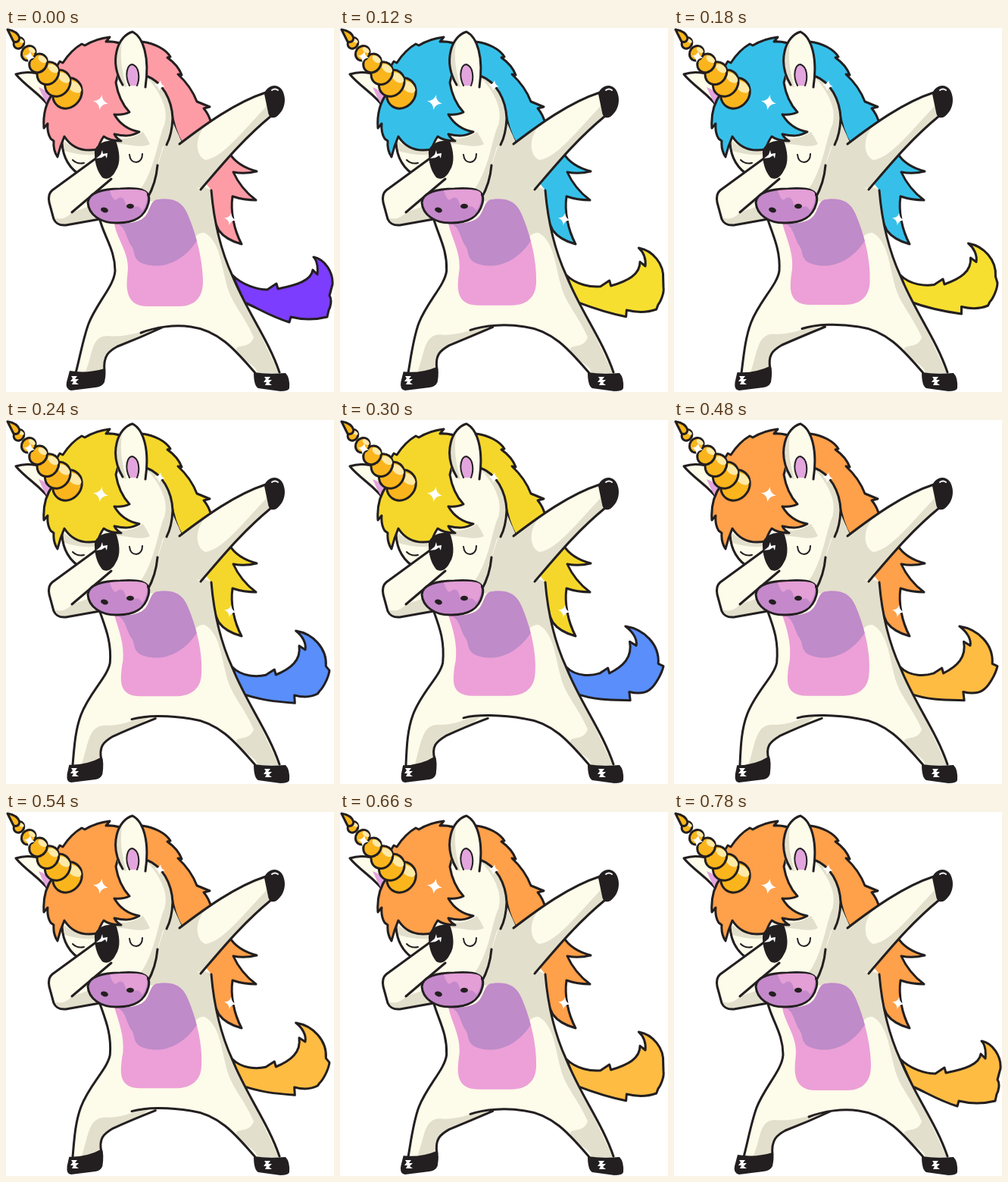
These frames come from a looping animation (433x480 px, 0.84 s). An HTML page:

```html
<!DOCTYPE html>
<html lang="en">
<head>
<meta charset="utf-8">
<title>Dabbing unicorn</title>
<style>
html, body { margin: 0; width: 100%; height: 100%; overflow: hidden; background: #fff; }
svg { display: block; width: 433px; height: 480px; }
.line { stroke: #231f20; stroke-width: 3; stroke-linejoin: round; stroke-linecap: round; fill: none; }
.thin { stroke-width: 2; }
.skin { fill: #fdfbea; }
.shade { fill: #e2dfcc; }
.hair { fill: var(--mane); }
.tail { fill: var(--tail); }
.hoof { fill: #231f20; }
.pink { fill: #e2a5dd; }
.muzzle { fill: #c589cb; }
.gold { fill: #fbb51c; }
.glint { fill: #fff; }
</style>
</head>
<body>
<svg viewBox="0 0 433 480">
  <defs>
    <path id="star" d="M0-10Q1.5-1.5 10 0Q1.5 1.5 0 10Q-1.5 1.5-10 0Q-1.5-1.5 0-10Z"/>
    <path id="zig" d="M0 0h8l-3 4 5 0-4 4 4 3-9 0 2-4-4 0 3-4Z"/>
    <clipPath id="patchClip"><path id="patchShape"/></clipPath>
    <clipPath id="bodyClip"><path id="bodyShape"/></clipPath>
  </defs>

  <!-- a~b blends from the low tail pose to the high one -->
  <path class="line tail" data-d="M299 326C312 339 332 345~336 345~342 345~332L357~353 337~325L359~355 344~332
    C384~372 339~322 403~383 333~309 405~378 319~287L411~387 325~292C412~389 315~284 410~382 306~274 406~371 302~266
    C421~397 305~270 432~420 322~290 431~418 338~318L427~427 353~319C431~423 358~332 428~413 369~346 426~408 372~350
    L424~405 381~351C408~400 385~356 392~391 385~356 376~383 381~354L374~385 388~366
    C348~360 380~367 332~338 369~370 315~309 362~360Z"/>

  <path class="line hair" d="M179 18C196 20 211 28 217 38L213 39C223 46 229 54 232 62L227 61C239 72 247 84 252 97L269 104L261 106Q268 114 271 126L232 152Q222 135 218 108L185 62Z"/>
  <path class="line hair" d="M295 165Q305 182 331 189Q315 193 300 190Q310 212 330 227Q314 227 299 222C296 242 301 266 311 285C296 281 287 275 281 267L256 212Z"/>

  <path id="body" class="skin"/>
  <g clip-path="url(#bodyClip)">
    <path class="shade" d="M185 200L232 150L262 210L276 215L307 342L360 455L332 455C328 440 312 442 304 426C302 415 321 425 327 408C316 381 296 361 291 337C284 312 282 280 262 270Q255 269 249 276L222 232L187 228Z"/>
    <path class="shade" data-d="M105~98 453C115~106 430~423 112~108 407~402 133~128 406~401C158~154 409~402 180~163 399~390 205~181 394~391L190~172 405~399C150~137 421~409 130~122 431 131~125 453Z"/>
  </g>
  <path id="patch" fill="#eca0d7"/>
  <path clip-path="url(#patchClip)" fill="#bf8bc9" d="M140 254C160 261 157 275 166 288C171 296 167 306 182 311C211 320 236 304 251 282L258 270L230 215L180 218Z"/>
  <path class="line" data-d="M124 253C130~133 276 144~137 293 144~134 320C143~130 340~338 120~105 362~358 109~94 390~388C102~86 409 98~86 432 92~86 455"/>
  <path class="line" data-d="M130~124 452~447C128~119 432~430 136~125 426~424 147~138 420~416Q178~160 408~405 206~193 395~393M178~160 402~391C198~178 394~387 223~210 391~388 244 394C283 399 306 429 329 455"/>
  <path class="line" d="M271 214C274 250 282 290 299 327C318 374 346 410 361 454"/>
  <path class="hoof" data-d="M84~83 452~456Q107 456~455 130~125 449~442Q133~128 453~450 130~126 467Q127~124 473 118 474L86 478Q78~80 476~479 80~81 467Z"/>
  <path class="hoof" d="M327 454Q345 457 369 455Q375 461 374 475Q373 479 362 479L333 475Q327 472 327 454Z"/>
  <use href="#zig" class="glint" x="86" y="459"/>
  <use href="#zig" class="glint" x="341" y="460"/>

  <path class="skin" d="M219 122L232 151C267 125 306 98 343 84L350 116C311 148 283 183 257 213L238 205L205 170Z"/>
  <path class="shade" d="M219 122L232 151L262 130C248 147 251 169 263 174C286 172 316 132 345 102L350 116C313 145 283 181 258 211L222 208L192 214L200 182Z"/>
  <path class="line" d="M229 153C263 127 303 98 343 85M350 116C311 148 283 183 257 213"/>
  <path class="hoof" d="M341 87C344 76 357 72 364 81C371 92 369 108 357 117C352 120 347 118 346 111Z"/>
  <path class="line thin" style="stroke:#fff" d="M351 82q4-3 8 0"/>

  <path class="line skin" d="M58 105C47 88 26 77 13 61C30 55 50 60 64 71L72 95Z"/>
  <path class="pink" d="M43 78Q55 82 60 92L55 102Q48 90 43 78Z"/>
  <path class="skin" d="M73 145C74 163 79 179 94 191L118 210L110 230L187 230Q197 206 200 182L208 157C220 140 221 119 217 103C212 83 200 69 185 63L145 50L90 80Z"/>
  <path class="shade" d="M75 148C89 160 110 164 121 162L120 156L149 146Q166 147 181 137Q186 145 190 153C179 160 155 151 145 153L125 166Q103 170 77 162Z"/>
  <path class="shade" d="M187 66C205 72 218 95 220 119Q219 145 207 157L199 184L187 227L175 216C197 188 200 147 209 128C215 109 206 88 187 66Z"/>
  <path class="line" d="M185 63C207 71 219 95 220 119Q219 141 212 154M200 181Q198 204 187 224M74 143C73 164 80 181 95 192"/>
  <path class="line thin" d="M88 174Q94 180 103 178M163 167Q164 177 172 177Q180 176 180 166"/>

  <path class="line hair" d="M61 69Q64 54 71 44L75 46Q86 29 100 21L104 23Q119 14 137 12L132 18Q147 17 158 24L145 72Q149 96 163 111Q155 115 143 114Q154 133 176 137C165 143 157 143 143 140Q146 146 152 149Q137 149 129 143Q124 150 121 160C100 164 86 157 77 143Q71 157 68 170Q62 161 63 149L59 146Q54 138 55 126L50 132Q48 105 62 86Z"/>
  <path class="skin" d="M154 75C135 43 148 10 167 5C181 12 190 38 184 78L168 84Z"/>
  <path class="shade" d="M148 68Q140 38 153 19Q149 45 159 78L154 77Z"/>
  <path class="line" d="M154 75C135 43 148 10 167 5C181 12 190 38 184 78"/>
  <path class="line pink thin" d="M163 76C156 62 160 48 167 48C176 51 177 66 173 76"/>

  <g id="horn"></g>

  <path class="skin" d="M120 170L61 214Q55 219 57 230L63 252Q67 261 79 260L124 252L140 212L146 190Z"/>
  <path class="shade" d="M87 243L111 235L114 248L124 252L79 260Q67 261 63 250Q77 255 87 243Z"/>
  <path class="line" d="M120 171L61 214Q55 219 57 230L63 252Q67 261 79 260L124 252M87 243L139 199"/>
  <path class="hoof" d="M117 166C116 153 132 147 145 149C150 162 152 178 145 188C140 198 133 201 127 197C120 188 117 177 117 166Z"/>
  <path class="glint" d="M119 172l6-5 2-6 1 5 6-1-1 7-2-4-5 3Z"/>

  <path class="line muzzle" d="M108 230C109 217 128 212 151 212C181 210 192 215 188 231C183 250 169 257 148 257C125 258 109 246 108 230Z"/>
  <path fill="#e39fd6" d="M137 214Q184 210 186 218Q187 232 180 241Q175 232 167 237Q160 241 157 229Q153 220 146 226Q141 229 137 214Z"/>
  <ellipse class="hoof" cx="130" cy="240" rx="5" ry="3.3" transform="rotate(15 130 240)"/>
  <ellipse class="hoof" cx="164" cy="235" rx="5" ry="3.3"/>

  <g id="stars" class="glint"></g>
</svg>
<script>
const STEP = 60, COUNT = 14, LAST = 6;
const $ = id => document.getElementById(id);

// First step, mane colour, tail colour
const palette = [
  [0, '#fe9ca5', '#7c3dfe'],
  [2, '#36c0e9', '#f7df30'],
  [4, '#f5d72b', '#598efb'],
  [6, '#16edc8', '#636eff'],
  [8, '#ffa04a', '#ffbc43']
];

// The head stays put; the belly leans with the hips.
const torso = `M124 253C130~133 276 144~137 293 144~134 320C143~130 340~338 120~105 362~358 109~94 390~388
  C102~86 409 98~86 432 92~86 455L130~124 452C128~119 432~430 136~125 426~424 147~138 420~416
  Q178~160 408~405 206~193 395~393C223~210 391~388 244 394 244 394C283 399 306 429 329 455L361 455
  C346 410 318 374 299 327C282 290 274 250 271 214L225 155L180 190Z`;
const belly = `M143 257C145~150 276 162~154 295 161~151 318C160~148 329 159~148 339 160~148 345
  C162~149 360~357 171~157 367~363 187~173 367~363L229~222 367~363C249~245 367~363 260~256 355~351 260~257 335
  C260 309 252 273 239 244C232 229 221 224 202 226C188 226 192 246 178 253Q163 260 143 257Z`;
for (const id of ['body', 'bodyShape']) $(id).dataset.d = torso;
for (const id of ['patch', 'patchShape']) $(id).dataset.d = belly;

// Horn rings shrink evenly from the brow to the tip.
const ring = (x, y, r) => `<g transform="translate(${x} ${y}) rotate(36)">
  <ellipse class="line gold" rx="${r * .87}" ry="${r}"/>
  <ellipse fill="#ffe9a6" cx="${r * .12}" cy="${-r * .58}" rx="${r * .5}" ry="${r * .3}"/></g>`;
$('horn').innerHTML = [0, 1, 2, 3, 4, 5].map(i => ring(81 - 12.8 * i, 86 - 13.2 * i, 21 - 2.7 * i)).join('') +
  '<path class="line gold" d="M2 2Q15 4 18 13Q17 20 10 18Z"/>';

const stars = [[125, 98, 1], [31, 38, .75], [203, 76, .7], [296, 252, .8]];
$('stars').innerHTML = stars.map(([x, y, s]) =>
  `<use href="#star" transform="translate(${x} ${y}) rotate(10) scale(${s})"/>`).join('');

const moving = [...document.querySelectorAll('[data-d]')];
const blend = (d, k) => d.replace(/([\d.]+)~([\d.]+)/g, (_, a, b) => (+a + (b - a) * k).toFixed(2));

let shown = -1;
function draw(time) {
  const step = Math.floor(time / STEP) % COUNT;
  if (step === shown) return;
  shown = step;
  const pose = Math.min(step, COUNT - 1 - step) / LAST;
  for (const el of moving) el.setAttribute('d', blend(el.dataset.d, pose));
  const [, mane, tail] = palette.filter(p => p[0] <= step).pop();
  const style = document.documentElement.style;
  style.setProperty('--mane', mane);
  style.setProperty('--tail', tail);
}

const start = performance.now();
function tick() {
  draw(performance.now() - start);
  requestAnimationFrame(tick);
}
tick();
</script>
</body>
</html>
```
